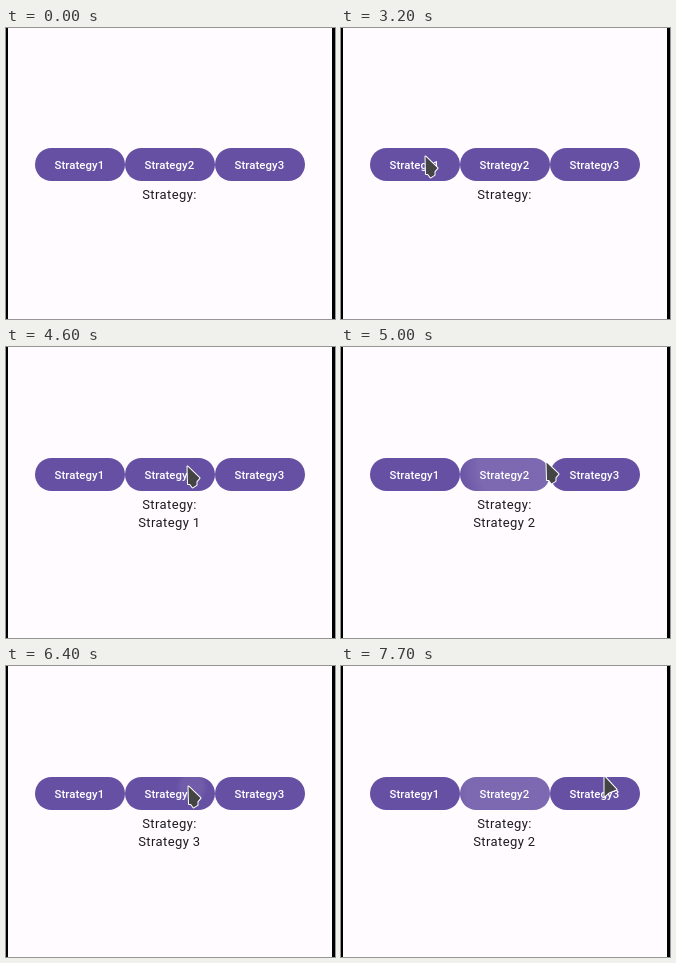
Recreate the animation shown at these times as an HTML page with a canvas. Size 329x291 px, loop 8000 ms.

```html
<!DOCTYPE html>
<html lang="en">
<head>
<meta charset="utf-8">
<style>
  html, body { margin: 0; width: 100%; height: 100%; overflow: hidden; background: #000; }
  canvas { display: block; }
</style>
</head>
<body>
<canvas id="stage" width="329" height="291"></canvas>
<script>
const ctx = document.getElementById('stage').getContext('2d');
const LOOP = 8000, STEP = 100;
const BUTTON = { left: 29, width: 90, height: 33 };

const arrow = new Path2D('M.5 .5V20.5L5 16.5L12.5 13.5Z');
const pointer = new Path2D('M.5 .5L12.5 12L9.5 15.5L9.5 19L5.5 21.5L3 18L1 18Z');

// Each entry holds from its time until the next: [ms, x, y, shape]
const cursorPath = [
  [100, 58, 40, arrow], [200, 98, 157, arrow], [600, 99, 162, arrow],
  [3200, 84, 128, pointer], [3300, 75, 130, pointer],
  [4100, 140, 115, arrow], [4200, 181, 119, pointer],
  [5000, 205, 115, pointer], [5100, 245, 113, pointer], [5200, 270, 120, pointer],
  [5800, 262, 114, arrow], [5900, 235, 111, arrow], [6000, 205, 112, arrow],
  [6100, 175, 117, pointer], [6200, 182, 120, pointer],
  [6600, 150, 115, arrow], [6700, 100, 118, pointer], [6800, 88, 120, pointer],
  [7000, 115, 114, arrow], [7100, 152, 111, arrow], [7200, 180, 120, pointer],
  [7700, 263, 110, arrow]
];

// x and y are the touch point inside the button; lead is the ripple's initial age
const presses = [
  { from: 3900, to: 4600, button: 0, x: 46, y: 10, lead: 0 },
  { from: 4800, to: 5200, button: 1, x: 63, y: 9, lead: 0 },
  { from: 5500, to: 6100, button: 2, x: 61, y: 10, lead: 180 },
  { from: 6400, to: 6700, button: 1, x: 67, y: 10, lead: 0 },
  { from: 6800, to: 7200, button: 0, x: 60, y: 10, lead: 0 },
  { from: 7500, to: LOOP, button: 1, x: 55, y: 10, lead: 30 }
];

const selections = [[4000, 1], [4900, 2], [5500, 3], [6500, 2], [6900, 1], [7600, 2]];

const current = (list, t) => list.filter(([start]) => start <= t).pop();

function text(string, x, y, font, spacing, color) {
  ctx.font = `${font} Roboto, sans-serif`;
  ctx.letterSpacing = spacing + 'px';
  ctx.fillStyle = color;
  ctx.fillText(string, x, y);
}

function drawRipple(press, t, left, top) {
  const age = t - press.from + press.lead;
  const radius = Math.min(85, 16 + age * 0.26);
  const x = left + press.x, y = top + press.y;
  const glow = ctx.createRadialGradient(x, y, 0, x, y, radius);
  const alpha = age ? 0.14 : 0.07;
  glow.addColorStop(0, `rgba(255,255,255,${alpha})`);
  glow.addColorStop(0.65, `rgba(255,255,255,${alpha})`);
  glow.addColorStop(1, 'rgba(255,255,255,0)');
  ctx.fillStyle = glow;
  ctx.fill();
}

function drawButton(index, top, t) {
  const left = BUTTON.left + index * BUTTON.width;
  ctx.beginPath();
  ctx.roundRect(left, top, BUTTON.width, BUTTON.height, BUTTON.height / 2);
  ctx.fillStyle = '#6650a4';
  ctx.fill();
  presses
    .filter(p => p.button === index && t >= p.from && t < p.to)
    .forEach(p => drawRipple(p, t, left, top));
  text('Strategy' + (index + 1), left + 19.5, top + 21, '500 11.4px', 0.08, '#fff');
}

function drawCursor([, x, y, shape]) {
  ctx.save();
  ctx.translate(x, y);
  ctx.lineJoin = 'round';
  ctx.lineWidth = 2;
  ctx.strokeStyle = '#fff';
  ctx.stroke(shape);
  ctx.fillStyle = '#444';
  ctx.fill(shape);
  ctx.restore();
}

function draw(time) {
  const t = Math.floor(time % LOOP / STEP) * STEP;
  const selection = current(selections, t);
  const top = selection ? 111 : 120;

  ctx.fillStyle = '#000';
  ctx.fillRect(0, 0, 329, 291);
  ctx.fillStyle = '#fffbfe';
  ctx.fillRect(2, 0, 324, 291);

  for (let i = 0; i < 3; i++) drawButton(i, top, t);
  text('Strategy:', 136.2, top + 51, '13px', 0.4, '#1c1b1f');
  if (selection) text('Strategy ' + selection[1], 132.2, top + 69, '13px', 0.4, '#1c1b1f');

  const cursor = current(cursorPath, t);
  if (cursor) drawCursor(cursor);
}

const start = performance.now();
function tick() {
  draw(performance.now() - start);
  requestAnimationFrame(tick);
}
tick();
</script>
</body>
</html>
```
